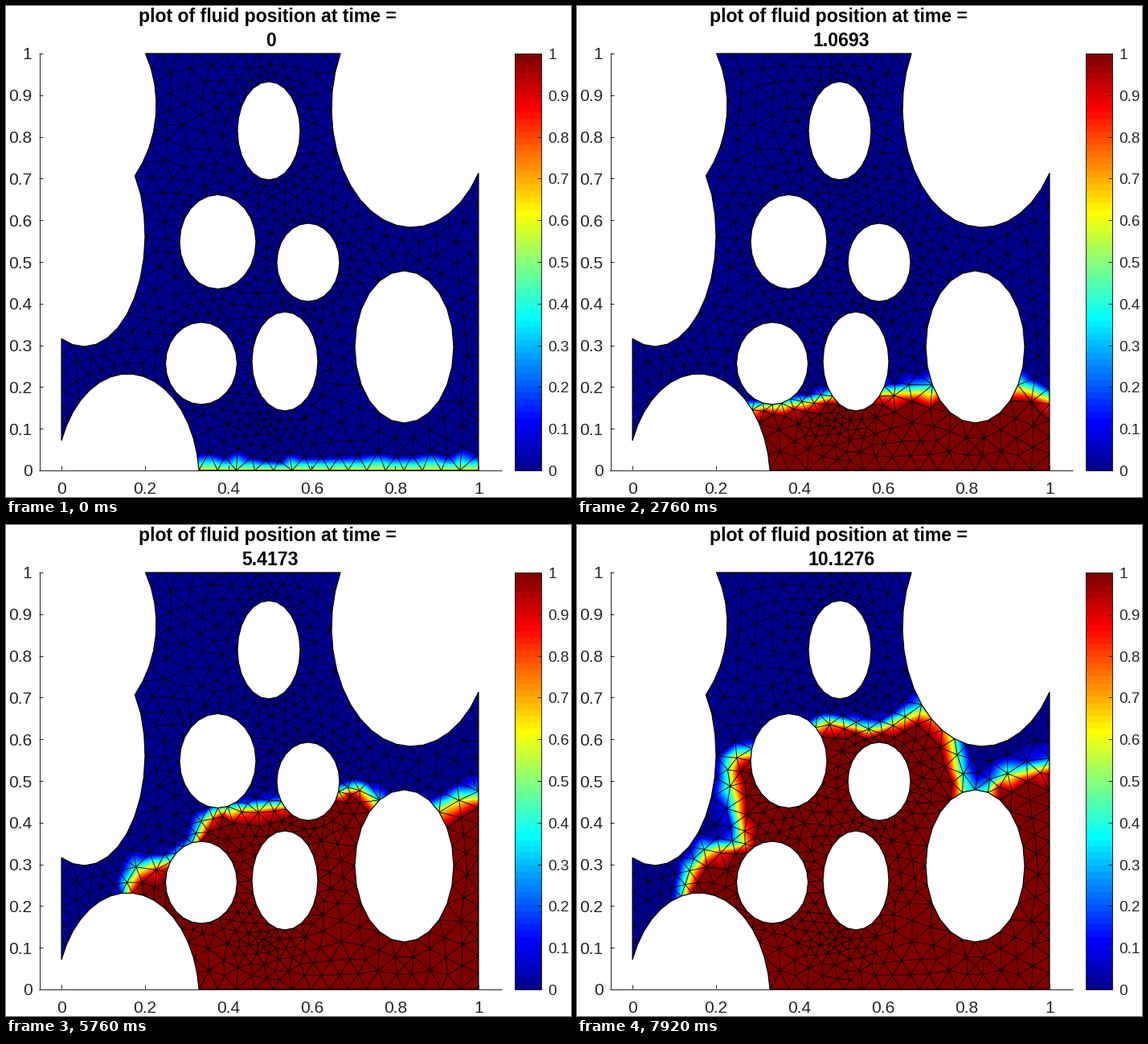
A matplotlib script for the animation above (8000 ms loop, 703 by 610 pixels).

```python
import numpy as np
import matplotlib.pyplot as plt
from matplotlib.animation import FuncAnimation
from matplotlib.patches import Polygon
from matplotlib.path import Path
from matplotlib.tri import Triangulation

W, H, DPI = 703, 610, 100
X0, X1, Y0, Y1 = 69, 588, 59, 577      # unit square in stage pixels
PX = 72 / DPI                          # points per pixel
DARK = (0.15, 0.15, 0.15)
FRAMES, INTERVAL, HOLD = 200, 40, 3    # the picture advances every third tick

# Fluid front (left to right) at a few key steps, with the simulated time.
# Each front runs on level past the right edge.
KEYS = np.array([0, 10, 23, 39, 48, 60, 66])
SIM = np.array([0, 0.38021, 1.0693, 3.2786, 5.4173, 8.4428, 10.1276])
FRONTS = [
    [(225, 574)],
    [(222, 527), (285, 521), (310, 532), (390, 533), (458, 522), (490, 532),
     (556, 518), (588, 528)],
    [(200, 500), (285, 492), (312, 484), (400, 478), (553, 471), (588, 487)],
    [(172, 462), (174, 442), (203, 435), (262, 394), (272, 382), (305, 374),
     (325, 388), (395, 374), (437, 388)],
    [(150, 460), (152, 441), (165, 425), (208, 415), (235, 395), (243, 371),
     (262, 354), (345, 347), (440, 325), (464, 346), (537, 353), (570, 336)],
    [(133, 465), (140, 440), (165, 412), (212, 402), (198, 350), (222, 315),
     (308, 268), (350, 278), (402, 261), (452, 253), (468, 262), (479, 334),
     (511, 334), (570, 308)],
    [(132, 465), (137, 434), (163, 400), (207, 398), (187, 310), (195, 286),
     (220, 282), (315, 242), (370, 255), (434, 226), (468, 258), (481, 334),
     (509, 334), (525, 312), (588, 298)],
]

# Obstacles: centre and radii
HOLES = [
    (327, 155, 39, 61), (263.5, 293, 47.5, 58.5), (376, 318.5, 39, 48.5),
    (243, 444, 44.5, 51), (347, 441.5, 41, 61.5), (495.5, 423.5, 61.5, 94.5),
]


def arc(cx, cy, a, b, t0, t1, n):
    t = np.linspace(t0, t1, n, endpoint=False)
    return np.column_stack([cx + a * np.cos(t), cy + b * np.sin(t)])


def line(p, q, n):
    return np.linspace(p, q, n, endpoint=False)


def outer_boundary():
    return np.vstack([
        arc(97, 285, 76, 138, 1.948, -0.566, 13),
        arc(47, 123, 140, 150, 0.627, -0.441, 8),
        line((173.5, Y0), (416, Y0), 12),
        arc(504.5, 127, 99.5, 148, 3.619, 0.575, 18),
        line((X1, 207.5), (X1, Y1), 18),
        line((X1, Y1), (240, Y1), 15),
        arc(151.5, 590, 89, 133, -0.098, -2.757, 17),
        line((X0, 540), (X0, 413.5), 6),
    ])


def node_mean(n, edges, values):
    """Average over each node's edges; values gives one array per edge end."""
    total = np.zeros((n,) + values[0].shape[1:])
    count = np.bincount(edges.ravel(), minlength=n)
    for ends, v in zip(edges.T, values):
        np.add.at(total, ends, v)
    return (total.T / np.maximum(count, 1)).T


def build_mesh(outer, holes):
    """Graded random mesh: finer around the small obstacles."""
    rng = np.random.default_rng(7)
    loops = [outer] + holes
    edge = np.vstack(loops)
    gap = np.concatenate([
        np.hypot(*(np.roll(p, -1, 0) - p).T) / 2
        + np.hypot(*(np.roll(p, 1, 0) - p).T) / 2 for p in loops])
    seeds = np.vstack([edge, [(326, 513)]])
    sizes = np.append(gap, 8)

    cand = rng.uniform((X0, Y0), (X1, Y1), (15000, 2))
    ok = Path(outer).contains_points(cand)
    for h in holes:
        ok &= ~Path(h).contains_points(cand)

    pts = np.empty((len(edge) + 4000, 2))
    pts[:len(edge)] = edge
    n = len(edge)
    for c in cand[ok]:
        size = min(22, np.min(sizes + 0.17 * np.hypot(*(seeds - c).T)))
        if np.min(np.hypot(*(pts[:n] - c).T)) > 0.76 * size:
            pts[n] = c
            n += 1
    pts = pts[:n]

    for _ in range(5):
        e = Triangulation(*pts.T).edges
        mean = node_mean(n, e, (pts[e[:, 1]], pts[e[:, 0]]))
        pts[len(edge):] = mean[len(edge):]
    return Triangulation(*pts.T), pts


def edge_size(tri, pts):
    i, j = tri.edges.T
    length = np.minimum(np.hypot(*(pts[i] - pts[j]).T), 24)
    return node_mean(len(pts), tri.edges, (length, length))


def rasterize(tri, pts):
    """Corner nodes and barycentric weights for every pixel of the square."""
    rows, cols = Y1 - Y0, X1 - X0
    node = np.zeros((3, rows, cols), dtype=np.intp)
    wt = np.zeros((3, rows, cols), dtype=np.float32)
    for t in tri.triangles:
        (px, py), (qx, qy), (rx, ry) = pts[t]
        det = (qy - ry) * (px - rx) + (rx - qx) * (py - ry)
        if abs(det) < 1e-3:
            continue
        xs, ys = (px, qx, rx), (py, qy, ry)
        c0 = max(int(min(xs)) - X0 - 1, 0)
        c1 = min(int(max(xs)) - X0 + 2, cols)
        r0 = max(int(min(ys)) - Y0 - 1, 0)
        r1 = min(int(max(ys)) - Y0 + 2, rows)
        x = np.arange(c0, c1)[None, :] + X0 + 0.5 - rx
        y = np.arange(r0, r1)[:, None] + Y0 + 0.5 - ry
        u = ((qy - ry) * x + (rx - qx) * y) / det
        v = ((ry - py) * x + (px - rx) * y) / det
        w = 1 - u - v
        inside = (u >= -1e-6) & (v >= -1e-6) & (w >= -1e-6)
        for k, weight in enumerate((u, v, w)):
            node[k, r0:r1, c0:c1][inside] = t[k]
            wt[k, r0:r1, c0:c1][inside] = weight[inside]
    return node, wt


def signed_distance(front, pts):
    """Positive on the wet side of the front."""
    f = np.array(front + [(W, front[-1][1])], float)
    a, d = f[:-1], np.diff(f, axis=0)
    rel = pts[:, None] - a
    s = np.clip((rel * d).sum(-1) / (d * d).sum(-1), 0, 1)
    dist = np.linalg.norm(rel - s[..., None] * d, axis=-1).min(1)
    wet = Path(np.vstack([f, [(W, W), (f[0, 0], W)]]))
    return np.where(wet.contains_points(pts), dist, -dist)


def jet64():
    i = np.arange(1, 65)
    rgb = [np.minimum(i - s, 48 + s - i) / 16 for s in (24, 8, -8)]
    rgba = np.column_stack(rgb + [np.ones(64)])
    return np.round(np.clip(rgba, 0, 1) * 255).astype(np.uint8)


outer = outer_boundary()
holes = [arc(*h, 0, 2 * np.pi, 24) for h in HOLES]
tri, pts = build_mesh(outer, holes)
node, wt = rasterize(tri, pts)
band = 1.2 * edge_size(tri, pts)
dists = [signed_distance(f, pts) for f in FRONTS]
lut = jet64()
slope = np.gradient(SIM, KEYS)


def locate(step):
    k = min(np.searchsorted(KEYS, step, side="right") - 1, len(KEYS) - 2)
    return k, (step - KEYS[k]) / (KEYS[k + 1] - KEYS[k])


def fluid(step):
    k, s = locate(step)
    phi = (1 - s) * dists[k] + s * dists[k + 1]
    c = np.clip(0.5 + phi / band, 0, 1).astype(np.float32)
    value = sum(c[n] * w for n, w in zip(node, wt))
    return lut[np.clip((value * 64).astype(np.intp), 0, 63)]


def clock(step):
    k, s = locate(step)
    d = KEYS[k + 1] - KEYS[k]
    ease = s * s * (3 - 2 * s)
    t = SIM[k] + ease * (SIM[k + 1] - SIM[k])
    t += d * s * (1 - s) * ((1 - s) * slope[k] - s * slope[k + 1])
    return f"{t:.{6 if t >= 10 else 5}g}"


plt.rcParams["font.family"] = "Liberation Sans"
fig = plt.figure(figsize=(W / DPI, H / DPI), dpi=DPI, facecolor="white")
ax = fig.add_axes([0, 0, 1, 1])
ax.axis("off")


def label(x, y, s, size, ha, color=DARK, **kw):
    return ax.text(x, y, s, fontsize=size * PX, ha=ha, va="baseline",
                   color=color, **kw)


def title(x, y, s):
    return label(x, y, s, 23, "center", "black", weight="bold")


def rule(x, y):
    ax.plot(x, y, color=DARK, lw=PX, solid_capstyle="butt", zorder=5)


def picture(data, extent):
    return ax.imshow(data, extent=extent, aspect="auto",
                     interpolation="nearest", zorder=1)


def outline(points, fill, z):
    return ax.add_patch(Polygon(points, fc=fill, ec="black", lw=1.1 * PX,
                                zorder=z))


# Domain, mesh and obstacles
img = picture(fluid(0), (X0, X1, Y1, Y0))
mesh = ax.triplot(tri, color="black", lw=0.9 * PX, zorder=2)[0]
rim = outline(outer, "none", 4)
img.set_clip_path(rim)
mesh.set_clip_path(rim)
for h in holes:
    outline(h, "white", 3)

# Axes
rule([41.5, 41.5], [Y0, Y1])
rule([41, 617], [576.5, 576.5])
for k in range(6):
    x = X0 + (X1 - X0) * k / 5
    rule([x, x], [576, 571])
    label(x, 606, f"{k / 5:g}", 21, "center")

# Colour bar shares the vertical scale
L, R = 633, 666
picture(lut[::-1, None], (L, R, Y1, Y0))
rule([L, R, R, L, L], [Y0, Y0, Y1, Y1, Y0])
for k in range(11):
    y = Y1 - (Y1 - Y0) * k / 10
    rule([41, 46], [y, y])
    rule([R - 5, R], [y, y])
    label(32.5, y + 7.5, f"{k / 10:g}", 21, "right")
    label(R + 8, y + 7, f"{k / 10:g}", 19, "left")

title(325.5, 20, "plot of fluid position at time =")
counter = title(329, 50, "0")

ax.set_xlim(0, W)
ax.set_ylim(H, 0)


def update(i):
    step = i // HOLD
    img.set_data(fluid(step))
    counter.set_text(clock(step))
    return img, counter


anim = FuncAnimation(fig, update, frames=FRAMES, interval=INTERVAL, repeat=True,
                     repeat_delay=0, cache_frame_data=False)
plt.show()
```
